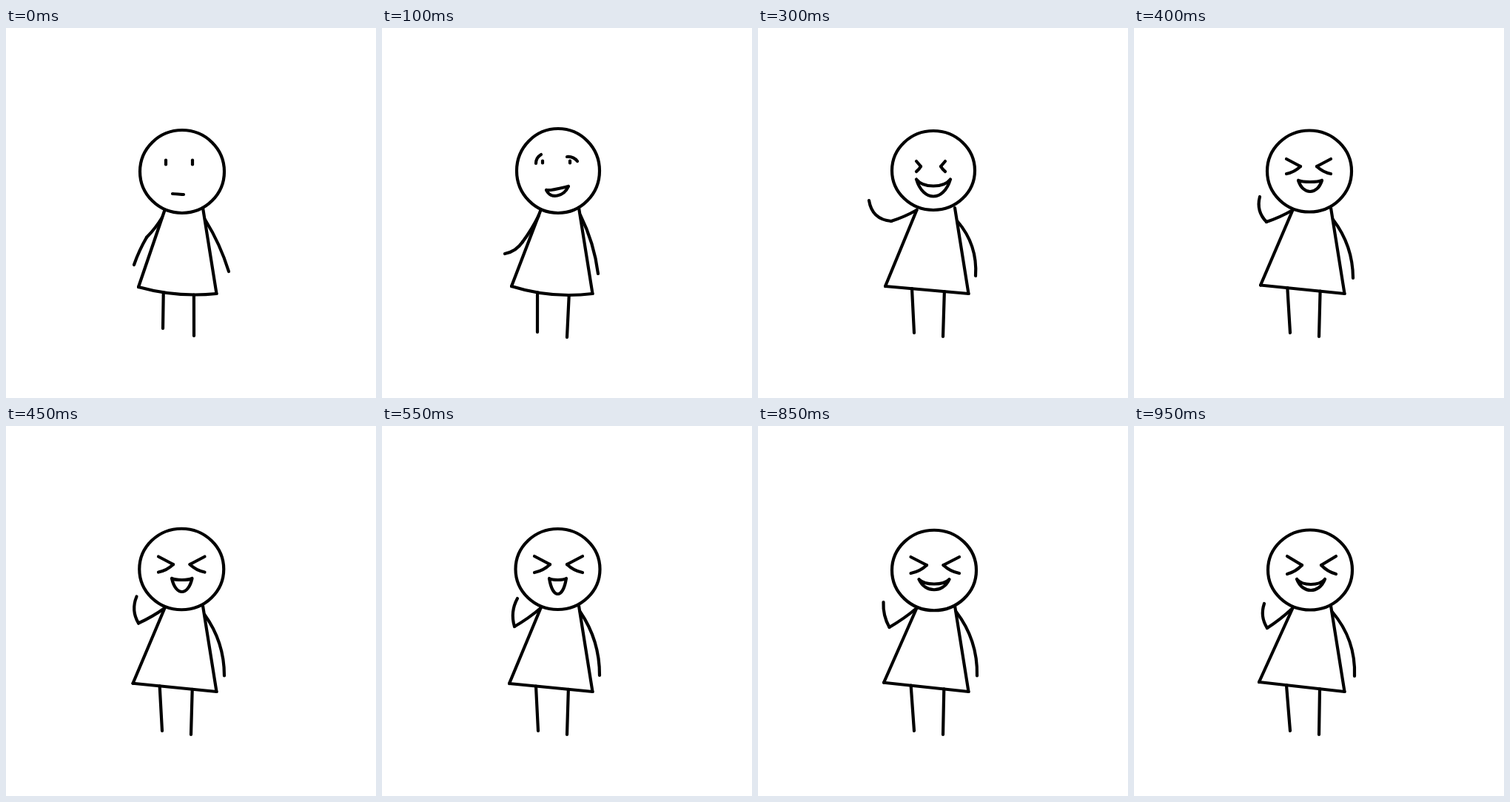
Write an HTML page with a canvas that moves like this. It is 500 px wide and 500 px high and loops after 1100 ms.

```html
<!DOCTYPE html>
<html lang="en">
<head>
<meta charset="utf-8">
<title>Waving figure</title>
<style>
html, body { margin: 0; width: 100%; height: 100%; overflow: hidden; background: #fff; }
canvas { display: block; width: 100vw; height: 100vh; object-fit: contain; }
</style>
</head>
<body>
<canvas id="stage" width="500" height="500"></canvas>
<script>
const ctx = document.getElementById('stage').getContext('2d');
const LOOP = 1100;
const NECK = { left: [214.5, 246], right: [266, 243] };
const HEM_RIGHT = [284.5, 359];

// Defaults shared by all poses; bends and sags are the bulge of a line in pixels.
const base = {
  head: [238, 194, 57, 54.5],
  shoulder: NECK.left,
  hem: [171, 347.5],
  sag: 0,
  elbow: [179, 262],
  hand: [170, 228],
  foreBend: 4,
  armTop: 251,
  armEnd: [294, 337],
  armBend: 7,
  feet: [211, 412, 250, 417]
};
const pose = changes => ({ ...base, ...changes });

// squint: left tip, right tip, y, width, height;  dots: left x, right x, y, height
// mouth: centre x, y, half width, upper sag, lower sag, tilt
const calm = pose({
  head: [238, 194, 57, 56], shoulder: [211, 256], hem: [179, 350], sag: 5,
  elbow: [190, 283], hand: [173, 320], foreBend: -1,
  armTop: 259, armEnd: [301, 329], armBend: 2.5, feet: [212, 406, 254, 416],
  face: { dots: [216, 252, 181.5, 6], mouth: [232.5, 224.5, 7.5, 0, 0, 0.5] }
});
const smile = pose({
  head: [238, 193, 56, 57], shoulder: [212, 253], hem: [175, 349], sag: 6,
  elbow: [190, 289], hand: [166, 305], foreBend: 3,
  armTop: 253, armEnd: [292, 332], armBend: 3.5, feet: [210, 411, 250, 418],
  face: { dots: [217, 254, 181, 3], brows: true, mouth: [237, 216.5, 15, 1, 10, -2.5] }
});
const wide = pose({
  head: [237, 192.5, 56, 53.5], hem: [172, 349],
  elbow: [180, 261], hand: [150, 233], foreBend: 8,
  armTop: 261, armEnd: [294, 335], armBend: 8,
  face: { squint: [220, 247, 187, 6, 7], mouth: [237, 204.5, 23, 9, 23, 0] }
});
const wave = pose({
  head: [237, 193.5, 57, 55], foreBend: 5, armTop: 259, armEnd: [296, 338],
  face: { squint: [225, 247, 187, 19, 10], mouth: [238, 206, 16, 2, 15, 0] }
});
const near = pose({
  head: [237.5, 193.5, 57, 54.5], hem: [172, 348], elbow: [179, 271], hand: [183, 233],
  face: { squint: [227, 250, 187, 21, 11], mouth: [237.5, 206, 11.5, 2, 21, 0] }
});
const shake = pose({
  head: [238, 195.5, 57, 54.5], elbow: [175, 271], hand: [163, 236], foreBend: 1,
  face: { squint: [229, 248, 188, 23, 10], mouth: [237, 207.5, 22, 5.5, 13, 0] },
  blur: true
});
const rest = pose({
  head: [238, 194.5, 57, 54], hem: [169, 346], elbow: [180, 273], hand: [176, 240],
  armEnd: [298, 338], armBend: 9,
  face: { squint: [227, 253, 188, 20, 12], mouth: [239, 207, 19, 7, 15, 0] }
});

// Averages numbers through nested arrays and objects; flags are dropped.
function between(a, b) {
  if (typeof a === 'number') return (a + b) / 2;
  if (Array.isArray(a)) return a.map((v, i) => between(v, b[i]));
  const shared = Object.keys(a).filter(key => key in b);
  return Object.fromEntries(shared.map(key => [key, between(a[key], b[key])]));
}

const timeline = [
  [0, calm],
  [50, { ...between(calm, smile), face: smile.face }],
  [100, smile],
  [150, { ...between(smile, wide), face: wide.face }],
  [300, wide],
  [400, wave],
  [450, between(wave, near)],
  [550, near],
  [700, shake],
  [850, between(shake, rest)],
  [950, rest]
];

// Stroke from a to b that bulges to the left of its direction of travel.
function curve(a, b, bend = 0) {
  const dx = b[0] - a[0], dy = b[1] - a[1];
  const k = 2 * bend / Math.hypot(dx, dy);
  ctx.beginPath();
  ctx.moveTo(...a);
  ctx.quadraticCurveTo((a[0] + b[0]) / 2 + k * dy, (a[1] + b[1]) / 2 - k * dx, ...b);
  ctx.stroke();
}

function drawBody(p) {
  const [hx, hy] = p.hem;
  curve(NECK.left, p.hem);
  curve(NECK.right, HEM_RIGHT);
  curve(p.hem, HEM_RIGHT, -p.sag);

  curve(p.shoulder, p.elbow, 1);
  curve(p.elbow, p.hand, p.foreBend);
  const slope = (HEM_RIGHT[0] - NECK.right[0]) / (HEM_RIGHT[1] - NECK.right[1]);
  curve([NECK.right[0] + 0.5 + slope * (p.armTop - NECK.right[1]), p.armTop], p.armEnd, p.armBend);

  [0.32, 0.71].forEach((t, i) => {
    const y = hy + t * (HEM_RIGHT[1] - hy) + 4 * p.sag * t * (1 - t);
    curve([hx + t * (HEM_RIGHT[0] - hx), y], p.feet.slice(2 * i, 2 * i + 2));
  });

  if (p.blur) {
    curve(p.elbow, [174, 236], 2);
    curve([156, 245], [156, 247]);
    curve([191, 241], [192, 241]);
  }
}

function drawEyes({ dots, brows, squint }) {
  if (dots) {
    const [left, right, y, h] = dots;
    for (const x of [left, right]) curve([x, y - h / 2], [x, y + h / 2]);
  }
  if (brows) {
    curve([208, 183], [215, 171], 2);
    curve([250, 174], [264, 180], 2);
  }
  if (squint) {
    const [left, right, y, w, h] = squint;
    for (const [x, side] of [[left, -1], [right, 1]]) {
      curve([x, y], [x + side * w, y - h]);
      curve([x, y], [x + side * w, y + h], -side * w / 12);
    }
  }
}

function drawMouth([x, y, w, upper, lower, tilt]) {
  ctx.beginPath();
  for (const sag of [upper, lower]) {
    const c = sag * 4 / 3;
    ctx.moveTo(x - w, y - tilt);
    ctx.bezierCurveTo(x - w * 0.6, y - tilt + c, x + w * 0.6, y + tilt + c, x + w, y + tilt);
  }
  ctx.stroke();
}

function draw(p) {
  ctx.fillStyle = '#fff';
  ctx.fillRect(0, 0, 500, 500);
  ctx.strokeStyle = '#000';
  ctx.lineWidth = 4.2;
  ctx.lineCap = ctx.lineJoin = 'round';
  ctx.beginPath();
  ctx.ellipse(...p.head, 0, 0, Math.PI * 2);
  ctx.stroke();
  drawBody(p);
  drawEyes(p.face);
  drawMouth(p.face.mouth);
}

const start = performance.now();
function tick() {
  const t = (performance.now() - start) % LOOP;
  draw(timeline.filter(([from]) => from <= t).pop()[1]);
  requestAnimationFrame(tick);
}
tick();
</script>
</body>
</html>
```
